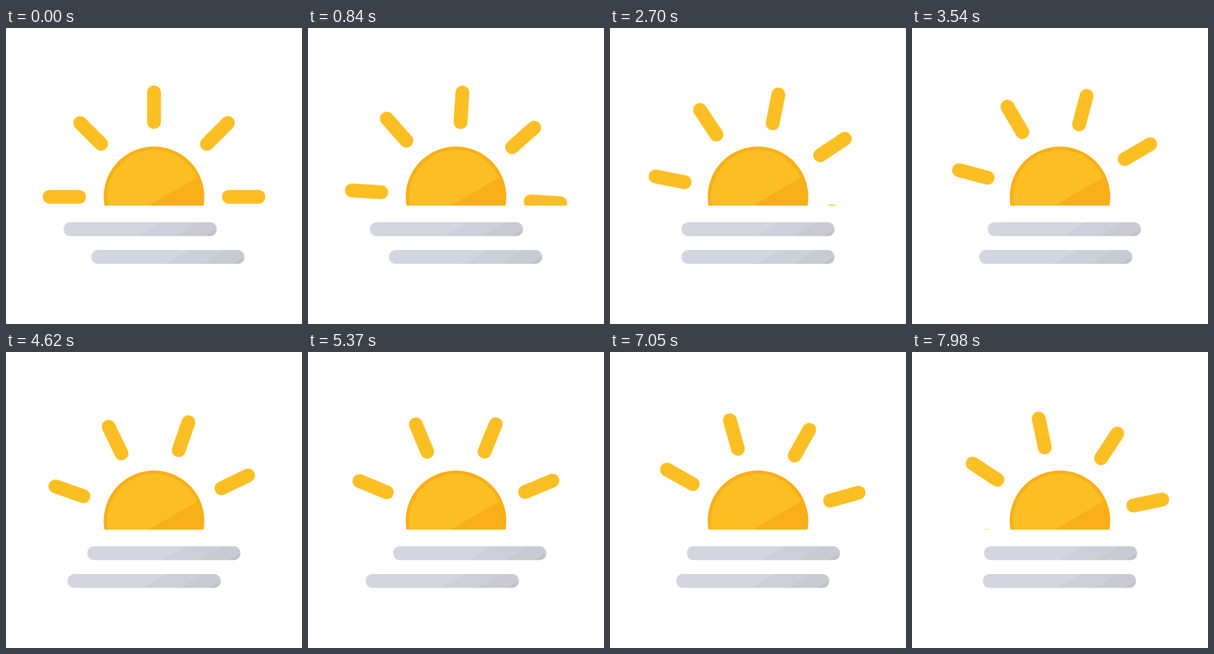
An HTML page for the animation above (8000 ms loop, 480 px wide and 480 px high).

```html
<!DOCTYPE html>
<html lang="en">
<head>
<meta charset="utf-8">
<title>Sun on the horizon</title>
<style>
  html, body { margin: 0; width: 100%; height: 100%; overflow: hidden; background: #fff; }
  svg { display: block; width: 100vw; height: 100vh; }
  #rays { transform-origin: 240px 273.75px; }
  #rays line { stroke: #fbbf24; stroke-width: 22.5; stroke-linecap: round; }
</style>
</head>
<body>
<svg viewBox="0 0 480 480">
  <defs>
    <clipPath id="sky"><rect width="480" height="288"/></clipPath>
    <linearGradient id="sunFill" gradientUnits="userSpaceOnUse" x1="200.6" y1="205.6" x2="279.4" y2="341.9">
      <stop offset=".55" stop-color="#fbbf24"/>
      <stop offset=".55" stop-color="#f9af18"/>
    </linearGradient>
    <linearGradient id="mistFill" gradientUnits="userSpaceOnUse" x1="0" y1="0" x2="70" y2="121.24">
      <stop offset=".571" stop-color="#d3d6de"/>
      <stop offset=".571" stop-color="#cdd0d9"/>
      <stop offset=".785" stop-color="#cdd0d9"/>
      <stop offset=".785" stop-color="#c9cbd2"/>
      <stop offset=".957" stop-color="#c9cbd2"/>
      <stop offset=".957" stop-color="#bfc2c7"/>
    </linearGradient>
    <rect id="bar" width="248.4" height="22.5" rx="11.25" fill="url(#mistFill)"/>
  </defs>
  <g clip-path="url(#sky)">
    <circle cx="240" cy="273.75" r="78.75" fill="url(#sunFill)" stroke="#f9af18" stroke-width="5.63"/>
    <g id="rays"></g>
  </g>
  <g id="upper"><use href="#bar" y="315"/></g>
  <g id="lower"><use href="#bar" y="360"/></g>
</svg>
<script>
  const LOOP = 8000;
  const CYCLE = 10800; // full sway of the mist, and one eighth turn of the rays
  const byId = id => document.getElementById(id);

  const rays = byId('rays');
  for (let i = 0; i < 8; i++) {
    const ray = document.createElementNS('http://www.w3.org/2000/svg', 'line');
    const attrs = { x1: 240, x2: 240, y1: 104.6, y2: 152.25, transform: `rotate(${i * 45} 240 273.75)` };
    for (const name in attrs) ray.setAttribute(name, attrs[name]);
    rays.append(ray);
  }

  const play = (id, frames) => byId(id).animate(frames, { duration: LOOP, iterations: Infinity });

  play('rays', [
    { transform: 'rotate(0deg)' },
    { transform: `rotate(${45 * LOOP / CYCLE}deg)` }
  ]);

  function sway(id, from, to) {
    const end = to + (from - to) * (LOOP - CYCLE / 2) / (CYCLE / 2);
    const at = x => `translateX(${x}px)`;
    play(id, [
      { transform: at(from) },
      { transform: at(to), offset: CYCLE / 2 / LOOP },
      { transform: at(end) }
    ]);
  }
  sway('upper', 93.3, 138.3);
  sway('lower', 138.3, 93.3);
</script>
</body>
</html>
```
